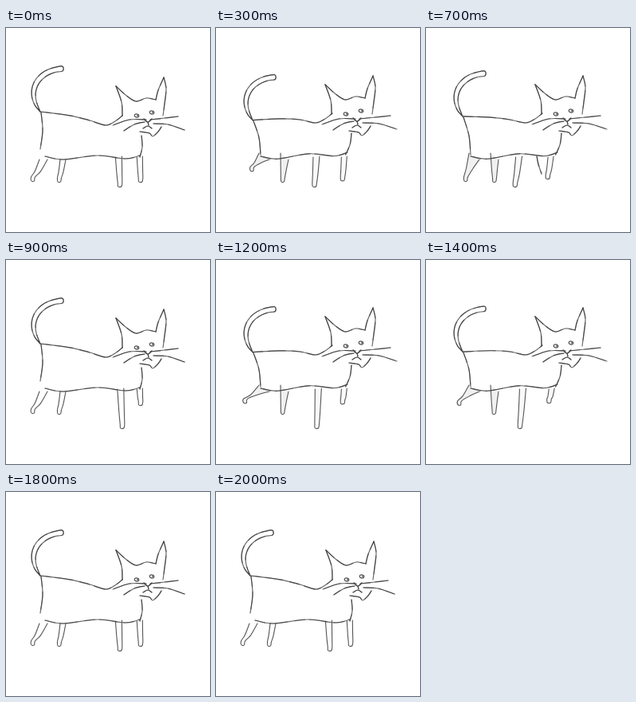
Recreate the animation shown at these times as an HTML page with a canvas. Size 256 px wide and 256 px high, loop 2100 ms.

```html
<!DOCTYPE html>
<html lang="en">
<head>
<meta charset="utf-8">
<title>Walking cat sketch</title>
<style>
  html, body { margin: 0; width: 100%; height: 100%; overflow: hidden; background: #fff; }
  canvas { display: block; width: 256px; height: 256px; }
</style>
</head>
<body>
<canvas id="stage" width="256" height="256"></canvas>
<script>
const ctx = document.getElementById('stage').getContext('2d');
const STEP = 100, STEPS = 21, STRIDE = 9;

const mix = (a, b, t) => a + (b - a) * t;
const clamp = v => Math.max(0, Math.min(1, v));
const points = s => s.split(' ').map(p => p.split(',').map(Number));

const back = points('43,108 80,111 105,116 125,122 137,117 146,110');
const rear = points('44,109 46,130 43,152');
const belly = points('49,161 72,165 115,160 150,164 168,160');
const chest = points('170,135 171,149 168,162');
const head = [
  '146,110 145,93 138,73', '138,73 150,84 163,92 176,88 188,90',
  '188,90 191,78 198,62', '198,62 201,76 199,95 197,110'
].map(points);
const face = [
  '195,124 191,130 184,136 180,132 168,130',
  '173,114 178,118 183,114', '178,118 179,122', '172,126 178,123 183,126'
].map(points);
const whiskers = [
  '176,115 155,115 134,122', '174,118 161,121 148,129',
  '181,115 199,113 216,111', '185,120 203,121 224,128'
].map(points);

// Two strides, then a short stand; each stride sweeps the feet slowly and returns fast.
function gait(frame) {
  const standing = frame >= 2 * STRIDE;
  const p = standing ? 0 : frame % STRIDE;
  const second = !standing && frame >= STRIDE ? 1 : 0;
  const sweep = p < 7 ? p / 7 : (STRIDE - p) / 2;
  const ease = Math.sin(sweep * Math.PI / 2);
  return {
    p, second, sweep, ease,
    soft: clamp(Math.min(p, STRIDE - p) / 2),
    bounce: Math.sin(Math.PI * (p / STRIDE) ** .8)
  };
}

function legsOf({ second, sweep, ease, soft }) {
  const near = mix(143, 112, ease) + 3 * second;
  const far = mix(169, 153, ease);
  const hip = mix(165, 157, soft);
  const hind = (left, right, x, y) => ({ left, right, x, y, top: hip, topR: 165, half: 2.5, shade: .08 });
  const fore = (left, width, x, y) => ({ left, right: left + width, x, y, top: 162, topR: 161, half: 2.8, shade: .03 });
  return [
    hind(42 + 12 * soft, 52 + 15 * soft, mix(34, 50, sweep ** mix(.4, 2, second)), 192 - 13 * Math.sin(Math.PI * sweep)),
    hind(68 + 13 * soft, 75 + 16 * soft, mix(67, 86, ease ** .25), 193),
    fore(near * .8 + 23, 8, near, 199 + 12 * second),
    fore(far * .7 + 46, 7, far, 193 - 11 * second - 4 * sweep)
  ];
}

// Smooth curve through all points
function trace(pts) {
  ctx.beginPath();
  ctx.moveTo(...pts[0]);
  for (let i = 0; i < pts.length - 1; i++) {
    const p = pts[i - 1] || pts[i], a = pts[i], b = pts[i + 1], n = pts[i + 2] || b;
    ctx.bezierCurveTo(a[0] + (b[0] - p[0]) / 6, a[1] + (b[1] - p[1]) / 6,
      b[0] - (n[0] - a[0]) / 6, b[1] - (n[1] - a[1]) / 6, b[0], b[1]);
  }
}

// Pencil stroke: an even line with darker stretches of pressure
function pencil(pts) {
  trace(pts);
  ctx.lineWidth = 1.2;
  ctx.strokeStyle = '#686868';
  ctx.stroke();
  ctx.setLineDash([13, 6, 22, 9]);
  ctx.strokeStyle = 'rgba(30,30,30,.5)';
  ctx.stroke();
  ctx.setLineDash([]);
}

function tailOutline(root, tip, shift) {
  const ctrl = [[43, root], [24, mix(root, tip, .45)], [39, tip + 3], [71, tip + 1]];
  const outer = [], inner = [];
  for (let i = 0; i <= 10; i++) {
    const t = i / 10, u = 1 - t;
    const at = k => u ** 3 * ctrl[0][k] + 3 * u * u * t * ctrl[1][k] + 3 * u * t * t * ctrl[2][k] + t ** 3 * ctrl[3][k];
    const slope = k => u * u * (ctrl[1][k] - ctrl[0][k]) + 2 * u * t * (ctrl[2][k] - ctrl[1][k]) + t * t * (ctrl[3][k] - ctrl[2][k]);
    const dx = slope(0), dy = slope(1), w = 3.2 * Math.sqrt(Math.sin(2.2 * t)) / Math.hypot(dx, dy);
    outer.push([at(0) + shift + dy * w, at(1) - dx * w]);
    inner.unshift([at(0) + shift - dy * w, at(1) + dx * w]);
  }
  return [...outer, ...inner];
}

function drawLeg({ left, right, x, y, top, topR, half, shade }, soft) {
  const mid = mix(top, y, .55);
  trace([[left, top], [mix(left, x - half, .55), mid], [x - half, y - 5], [x - half + .5, y],
    [x + half - 1, y], [x + half, y - 5], [mix(right, x + half, .55), mid], [right, topR]]);
  ctx.fillStyle = `rgba(70,70,70,${shade * soft})`;
  ctx.fill();
  ctx.lineWidth = 1.1;
  ctx.strokeStyle = '#555';
  ctx.stroke();
}

function drawHead(soft) {
  ctx.save();
  ctx.translate(-soft, -2 * soft);
  head.forEach(pencil);
  for (const [x, y] of [[164, 110], [183, 106]]) {
    ctx.beginPath();
    ctx.ellipse(x, y, 2.8, 2, .3, 0, 7);
    ctx.strokeStyle = '#555';
    ctx.stroke();
    ctx.fillStyle = '#888';
    ctx.fillRect(x, y - 1, 2, 2);
  }
  ctx.translate(0, soft);
  face.forEach(pencil);
  whiskers.forEach(w => pencil(w.map(([x, y]) => [x + 4 * soft * clamp((x - 185) / 30), y])));
  ctx.restore();
}

function draw(frame) {
  const pose = gait(frame), { soft, bounce, p } = pose;
  const root = 105 + 11 * bounce, tip = 50 + 11 * bounce, drop = root - 108;
  ctx.fillStyle = '#fff';
  ctx.fillRect(0, 0, 256, 256);
  ctx.lineCap = ctx.lineJoin = 'round';

  pencil(tailOutline(root, tip, 3 * soft));
  pencil(back.map(([x, y]) => {
    const near = clamp(1 - (x - 43) / 60);
    return [x + 3 * soft * near, y + drop * near - 3 * soft * clamp((x - 95) / 30)];
  }));
  pencil(rear.map(([x, y]) => {
    const low = clamp((y - 109) / 43);
    return [x + soft * mix(3, 13, low), y + mix(drop, 7 * soft, low)];
  }));
  legsOf(pose).forEach(leg => drawLeg(leg, soft));
  pencil(belly.map(([x, y]) => {
    const along = clamp((x - 49) / 119);
    return [x + soft * mix(7, -3, along), y - 4 * soft * along];
  }));
  pencil(chest.map(([x, y]) => [x - soft * (y - 135) / 5, y - 3 * soft]));
  if (p >= 6 && p < 8) pencil([[139, 161], [141, 171], [145, 183]]);
  drawHead(soft);
}

function tick() {
  draw(Math.floor(performance.now() / STEP) % STEPS);
  requestAnimationFrame(tick);
}
tick();
</script>
</body>
</html>
```
